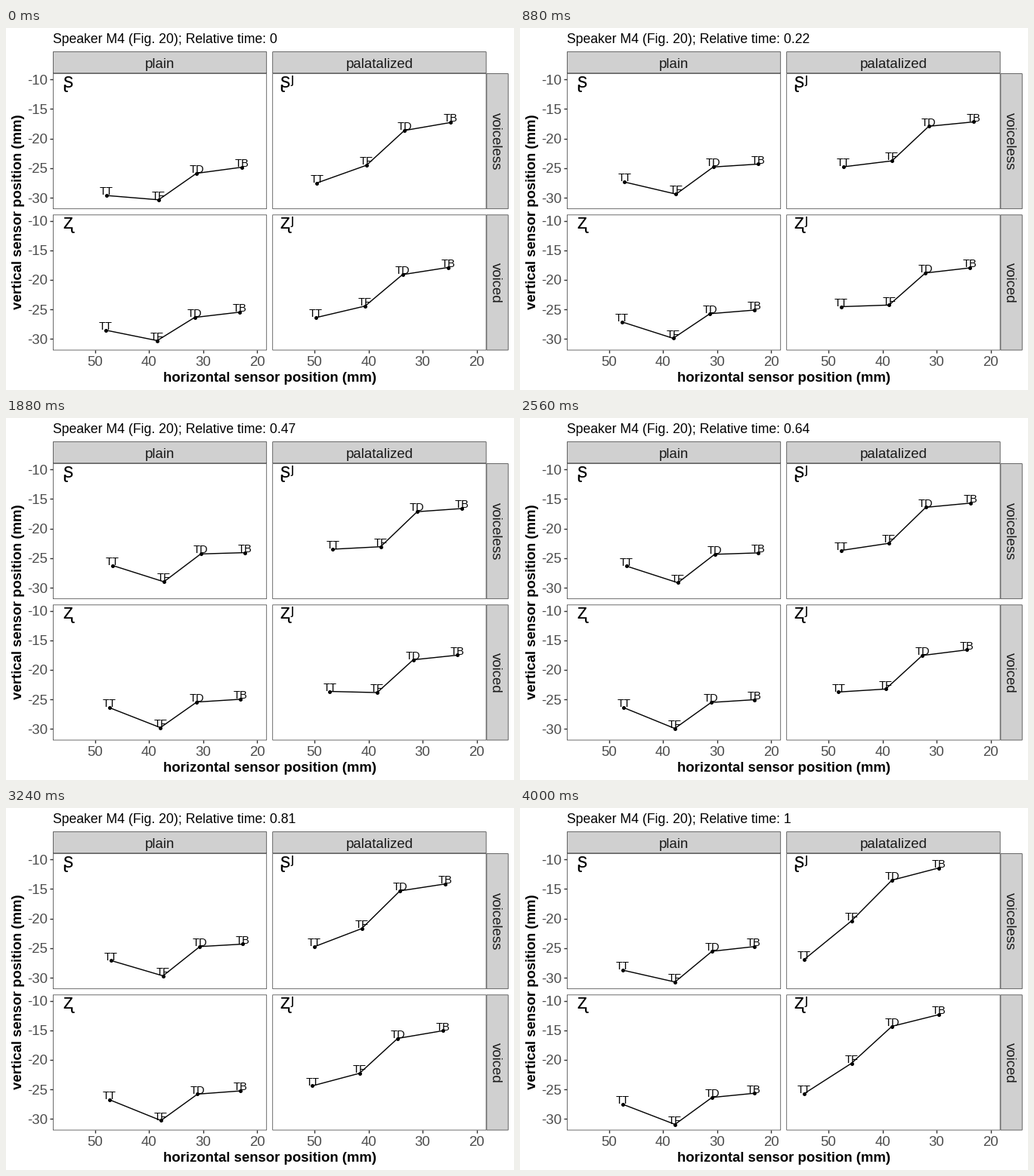
Write a matplotlib script that moves like this. It is 672x480 px and loops after 4.04 s.

```python
import numpy as np
import matplotlib.pyplot as plt
from matplotlib.animation import FuncAnimation
from matplotlib.patches import Rectangle

W, H, DPI = 672, 480, 96
STEPS = 101
PX = 72 / DPI  # points per pixel
EDGE, FILL, TICK, STRIP = "#333333", "#d0d0d0", "#4d4d4d", "#1a1a1a"
BIG = 18.67

PW, PH = 283.1, 179.9
COLS = {"plain": 62, "palatalized": 352.4}
ROWS = {"voiceless": 60.2, "voiced": 247.5}

plt.rcParams["font.family"] = ["Liberation Sans", "DejaVu Sans"]

# Tongue poses of the voiced row, one (x, y) per sensor
SENSORS = ("TT", "TF", "TD", "TB")
K = np.arange(4)
START = {
    "plain": [(131.5, 400.6), (200, 414.5), (249.5, 383.8), (309, 376.8)],
    "palatalized": [(410, 384), (475, 368.7), (524.5, 327), (585, 317.5)],
}
END = {
    "plain": [(135.5, 392.7), (205, 419.5), (254, 383.8), (309.5, 378.3)],
    "palatalized": [(375.5, 379), (438.5, 338.5), (492, 289.5), (554, 274)],
}
ARCH = {  # mid-course bulge: forward, then upward
    "plain": (5 - 1.3 * K, (-15.7, -4.5, -7.2, -4)),
    "palatalized": (22 - 2.2 * K, (-21, -1.5, -2.5, 1.5)),
}
# What voicelessness adds to start, end and bulge
UNVOICED = [np.transpose(xy) for xy in (
    (1.2 + 0.65 * K, (8.8, 0.6, -3.8, -4.9)),
    (0 * K, (9.5, -1.5, -6.5, -7.2)),
    (0 * K + 3, (-10.2, -6.5, -5, -2)),
)]


def course(col, row):
    """Start, end and bulge of one panel's tongue."""
    parts = [np.array(START[col]), np.array(END[col]), np.transpose(ARCH[col])]
    if row == "voiceless":
        parts = [p + d for p, d in zip(parts, UNVOICED)]
        for p in parts[:2]:
            p[:, 1] += ROWS["voiceless"] - ROWS["voiced"]
    return parts


def pose(parts, t):
    start, end, arch = parts
    return start + (end - start) * t**3 + arch * 4 * t * (1 - t)


fig = plt.figure(figsize=(W / DPI, H / DPI), dpi=DPI, facecolor="white")
ax = fig.add_axes([0, 0, 1, 1])
ax.set(xlim=(0, W), ylim=(H, 0))
ax.axis("off")


def text(x, y, s, size, **kw):
    kw = {"ha": "center", "va": "baseline", "rotation_mode": "anchor", **kw}
    return ax.text(x, y, s, fontsize=size * PX, **kw)


def box(x, y, w, h, fill):
    """Box whose border lies fully inside it."""
    b = 0.71
    ax.add_patch(Rectangle((x + b / 2, y + b / 2), w - b, h - b, fc=fill,
                           ec=EDGE, lw=b * PX, snap=False))


def tick(xs, ys):
    ax.plot(xs, ys, color=EDGE, lw=1.4 * PX, solid_capstyle="butt")


for name, x in COLS.items():
    box(x, 31.3, PW, 28.9, FILL)
    text(x + PW / 2, 53, name, BIG, color=STRIP)
    for i in range(4):
        tx = x + 55.5 + 71.6 * i
        tick((tx, tx), (427.4, 431.1))
        text(tx, 448.3, str(50 - 10 * i), BIG, color=TICK)

for name, y in ROWS.items():
    box(635.5, y, 29.1, PH, FILL)
    text(643.3, y + PH / 2, name, BIG, color=STRIP, rotation=270)
    for i in range(5):
        ty = y + 8 + 39.15 * i
        tick((58.3, 62), (ty, ty))
        text(55, ty + 6.7, str(-10 - 5 * i), BIG, color=TICK, ha="right")

tongues = []
for row, y in ROWS.items():
    glyph = "ʂ" if row == "voiceless" else "ʐ"
    for col, x in COLS.items():
        box(x, y, PW, PH, "white")
        soft = col == "palatalized"
        text(x + 19.5 - 3 * soft, y + 18.8, glyph, 26.5)
        if soft:
            text(x + 26, y + 12.5, "ȷ", 18)
        line, = ax.plot([], [], "k-o", lw=1.42 * PX, ms=5 * PX, mew=0)
        tags = [text(0, 0, s, 14.67) for s in SENSORS]
        tongues.append((course(col, row), line, tags))

text(348.5, 469, "horizontal sensor position (mm)", BIG, weight="bold")
text(21, 243.7, "vertical sensor position (mm)", BIG, weight="bold",
     rotation=90)
title = text(62, 20, "", 17.6, ha="left")


def draw(i):
    t = i / (STEPS - 1)
    title.set_text(f"Speaker M4 (Fig. 20); Relative time: {t:g}")
    artists = [title]
    for parts, line, tags in tongues:
        pts = pose(parts, t)
        line.set_data(*pts.T)
        for tag, (x, y) in zip(tags, pts):
            tag.set_position((x, y - 0.8))
        artists += [line, *tags]
    return artists


anim = FuncAnimation(fig, draw, frames=STEPS, interval=40, repeat=True,
                     repeat_delay=0)
plt.show()
```
